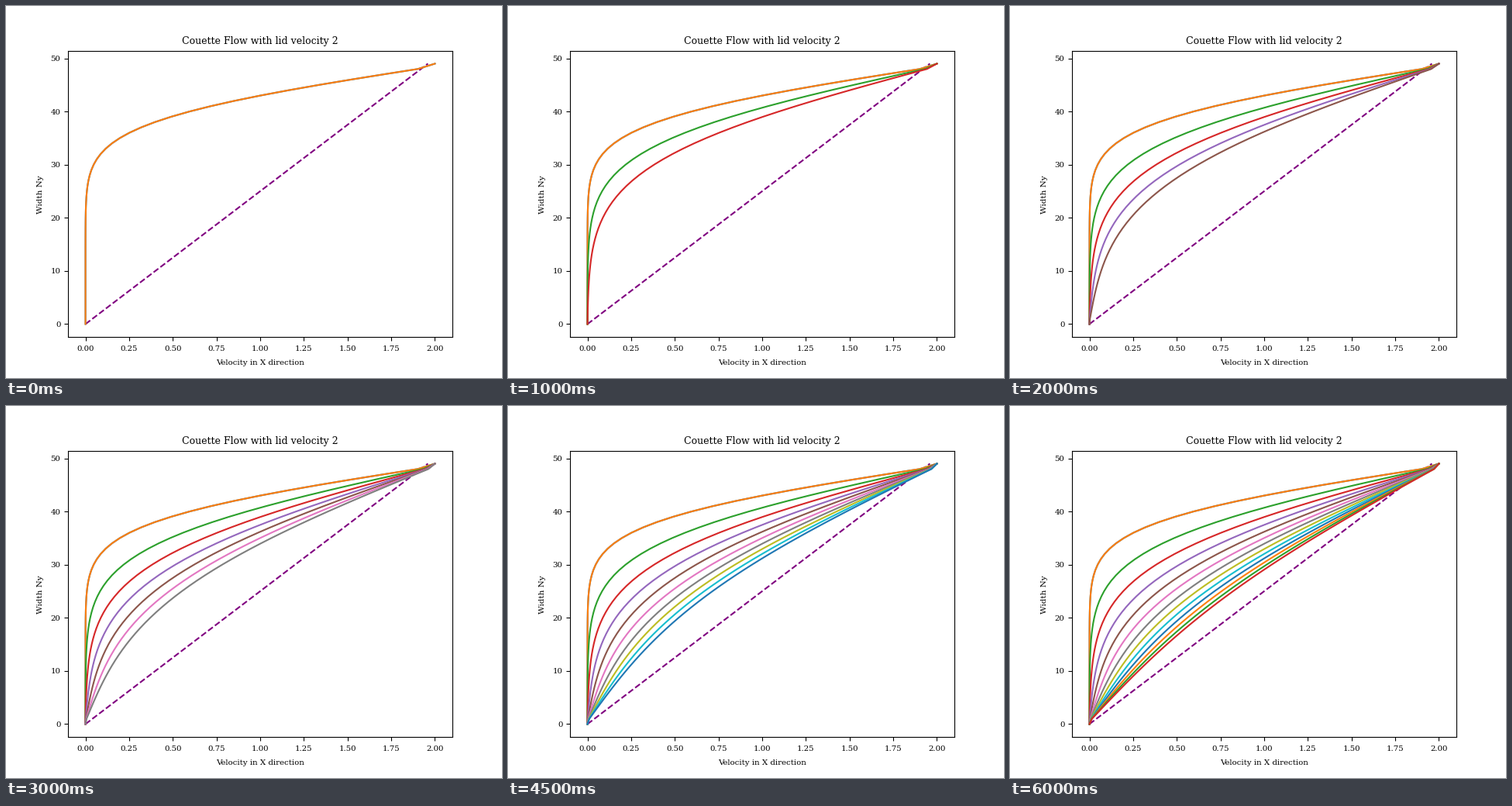
Recreate the animation shown at these times as a matplotlib script. Size 640 by 480 pixels, loop 9500 ms.

```python
import numpy as np
import matplotlib.pyplot as plt
from matplotlib.animation import FuncAnimation

plt.rcParams["font.family"] = "DejaVu Serif"

LID = 2.0
NY = 50
VISCOSITY = 1 / 6
STEPS = 200        # simulation steps between two profiles
PROFILES = 13
FRAMES = 19        # the last profile is held until the loop ends

y = np.arange(NY)


def profile(index):
    """Velocity across the channel, with walls half a cell inside the ends."""
    height = NY - 2
    z = (y - 0.5) / height
    n = np.arange(1, 80)[:, None]
    time = VISCOSITY * STEPS * (index + 1) / height**2
    modes = (-1.0) ** n / n * np.exp(-((n * np.pi) ** 2) * time)
    u = LID * (z + 2 / np.pi * (modes * np.sin(n * np.pi * z)).sum(axis=0))
    u[0], u[-1] = 0, LID
    return u


fig, ax = plt.subplots(figsize=(6.4, 4.8), dpi=100)
ax.set_xlim(-0.05 * LID, 1.05 * LID)
ax.set_ylim(-0.05 * (NY - 1), 1.05 * (NY - 1))
ax.set_xticks(np.arange(0, 2.01, 0.25))
ax.tick_params(labelsize=7.3)
ax.tick_params(axis="x", pad=4)
ax.set_title("Couette Flow with lid velocity 2", fontsize=9)
fig.text(328 / 640, 1 - 463 / 480, "Velocity in X direction",
         fontsize=7.4, ha="center", va="baseline")
fig.text(47 / 640, 1 - 243.5 / 480, "Width Ny", fontsize=7.5, rotation=90,
         rotation_mode="anchor", ha="center", va="baseline")

ax.plot(LID * y / NY, y, "--", color="purple")
ax.plot(profile(0), y, color="C0")
curves = [ax.plot(profile(i), y, color=f"C{(i + 1) % 10}")[0]
          for i in range(PROFILES)]


def update(frame):
    for i, curve in enumerate(curves):
        curve.set_visible(i <= frame)
    return curves


anim = FuncAnimation(fig, update, frames=FRAMES, interval=500,
                     repeat=True, repeat_delay=0)
plt.show()
```
